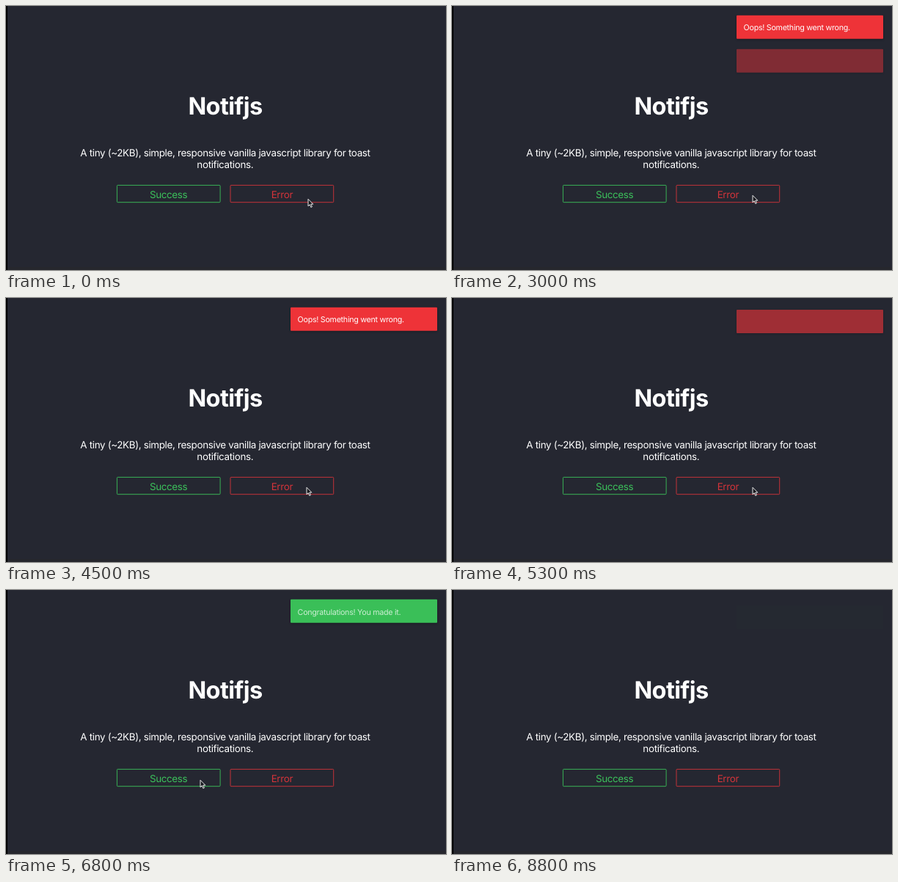
Animation, 600 px wide and 360 px high, one loop 9100 ms. Source, as an HTML page:

```html
<!DOCTYPE html>
<html lang="en">
<head>
<meta charset="utf-8">
<title>Notifjs</title>
<style>
  html, body { margin: 0; width: 100%; height: 100%; overflow: hidden; background: #252731; }
  svg { display: block; width: 600px; height: 360px; font-family: Inter, "Open Sans", sans-serif; letter-spacing: -.025em; }
  text { letter-spacing: -.025em; text-rendering: geometricPrecision; }
  .centered { text-anchor: middle; font-size: 13.4px; fill: #fff; }
  .title { font-size: 32.5px; font-weight: 700; letter-spacing: -.02em; }
  .button rect { fill: none; stroke: currentColor; stroke-width: .9; }
  .button text { fill: currentColor; }
  .toast rect { filter: drop-shadow(0 1px 1.5px rgba(0, 0, 0, .3)); }
  .toast text { font-size: 10.7px; fill: #fff; }
</style>
</head>
<body>
<svg viewBox="0 0 600 360">
  <rect width="600" height="360" fill="#252731"/>
  <rect y="356" width="600" height="4" fill="#26272d"/>
  <rect width="2" height="360" fill="#000"/>
  <text class="centered title" x="299" y="147.8">Notifjs</text>
  <text class="centered" x="299" y="205.2">A tiny (~2KB), simple, responsive vanilla javascript library for toast</text>
  <text class="centered" x="298.8" y="221">notifications.</text>
  <g class="button" color="#3cc15b">
    <rect x="151.4" y="244.4" width="140.7" height="23.3" rx="1"/>
    <text class="centered" x="221.6" y="261.8">Success</text>
  </g>
  <g class="button" color="#d4343a">
    <rect x="306" y="244.4" width="140.7" height="23.3" rx="1"/>
    <text class="centered" x="376.4" y="261.8">Error</text>
  </g>
  <g id="toasts"></g>
  <path id="cursor" d="M0 0V9.6L2.2 7.5 3.8 11.2 5.4 10.5 3.8 6.9H6.8Z" fill="#17181d" stroke="#fff" stroke-width=".9"/>
</svg>
<script>
const LOOP = 9100, BOX_FADE = 330, TEXT_FADE = 250, SLOT = 41.5;
const ERROR = { message: 'Oops! Something went wrong.', color: '#ee3338' };
const SUCCESS = { message: 'Congratulations! You made it.', color: '#3abf58' };

const toasts = [
  { ...ERROR, enter: 1750, leave: 3900 },
  { ...ERROR, enter: 2850, leave: 4920 },
  { ...SUCCESS, enter: 6287, leave: 8225 },
];

// [time, x, y]; a missing position hides the pointer
const cursorStops = [
  [0, 412, 263], [300, 411, 260], [500, 410, 258],
  [5500, 335, 259], [5800, 277, 262], [6000, 265, 259], [7000],
];

const clamp = v => Math.max(0, Math.min(1, v));
const cursor = document.getElementById('cursor');

function addNode(parent, tag, attrs) {
  const node = document.createElementNS('http://www.w3.org/2000/svg', tag);
  for (const key in attrs) node.setAttribute(key, attrs[key]);
  return parent.appendChild(node);
}

for (const toast of toasts) {
  toast.group = addNode(document.getElementById('toasts'), 'g', { class: 'toast' });
  addNode(toast.group, 'rect', { x: 388, y: 12.8, width: 200, height: 32, rx: 1, fill: toast.color });
  toast.label = addNode(toast.group, 'text', { x: 397.6, y: 32.8 });
  toast.label.textContent = toast.message;
}

// The picture holds for 300 ms and 200 ms in turn.
function heldTime(t) {
  const rest = t % 500;
  return Math.min(t - rest + (rest >= 300 ? 300 : 0), 8800);
}

// Box fades in before its text; the text fades out before the box.
function drawToasts(t) {
  let slot = 0;
  for (const { enter, leave, group, label } of toasts) {
    const box = Math.min(clamp((t - enter) / BOX_FADE),
                         clamp(1 - (t - leave - TEXT_FADE) / BOX_FADE));
    const text = Math.min(clamp((t - enter - BOX_FADE) / TEXT_FADE),
                          clamp(1 - (t - leave) / TEXT_FADE));
    group.setAttribute('opacity', box);
    group.setAttribute('transform', `translate(0 ${slot * SLOT + 8 * (1 - box)})`);
    label.setAttribute('opacity', text);
    label.setAttribute('transform', `translate(0 ${5 * (1 - text)})`);
    if (box > 0) slot++;
  }
}

function drawCursor(t) {
  const [, x, y] = cursorStops.filter(stop => stop[0] <= t).pop();
  cursor.setAttribute('visibility', x === undefined ? 'hidden' : 'visible');
  if (x !== undefined) cursor.setAttribute('transform', `translate(${x} ${y + .3})`);
}

const start = performance.now();
function frame() {
  const t = heldTime((performance.now() - start) % LOOP);
  drawToasts(t);
  drawCursor(t);
  requestAnimationFrame(frame);
}
frame();
</script>
</body>
</html>
```
